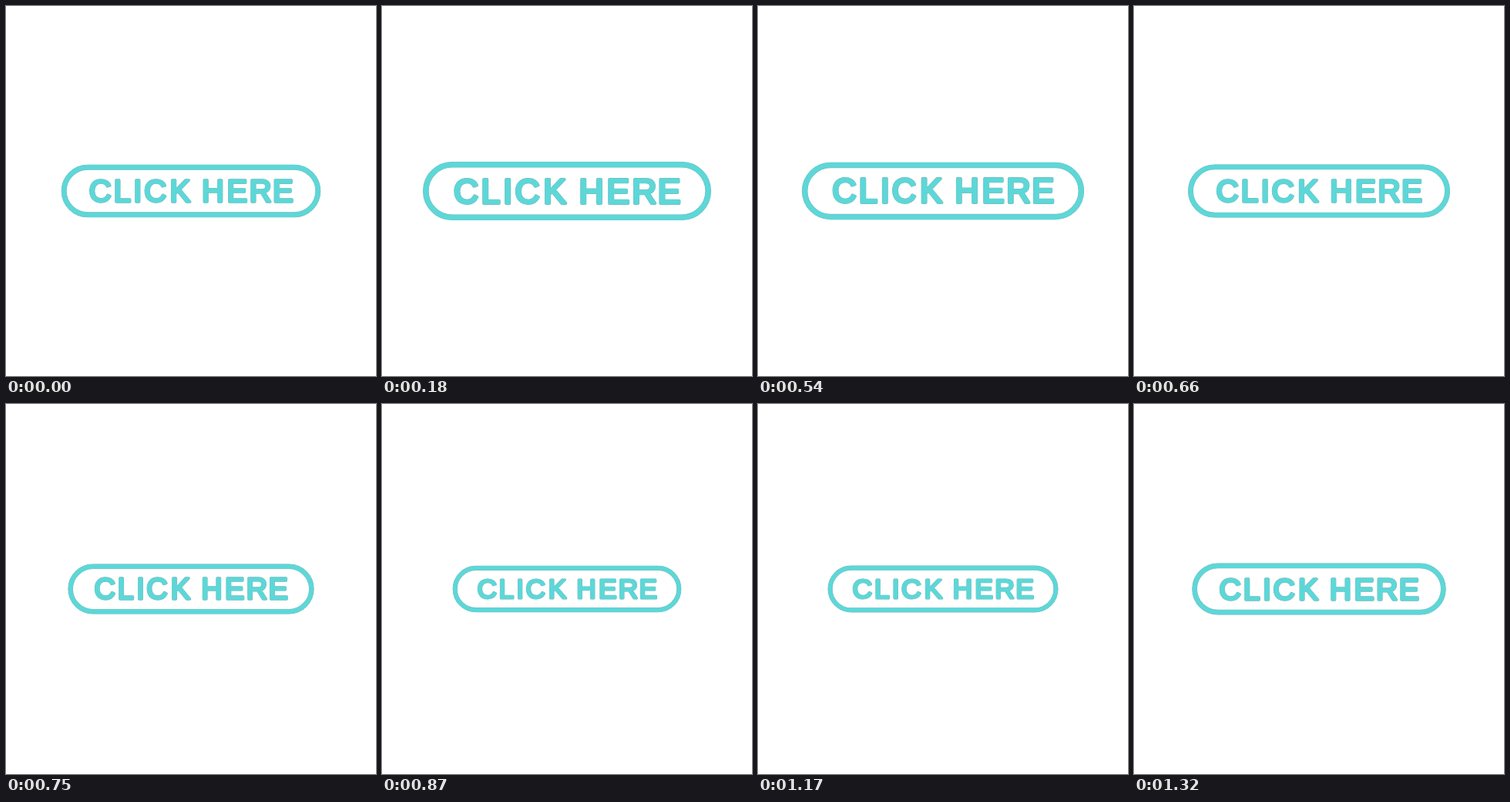
Write an HTML page that moves like this. It is 480 by 480 pixels and loops after 1.35 s.

```html
<!DOCTYPE html>
<html lang="en">
<head>
<meta charset="utf-8">
<title>Click here</title>
<style>
  html, body { margin: 0; width: 100%; height: 100%; overflow: hidden; background: #fff; }
  svg { display: block; width: 100vw; height: 100vh; }
  rect { fill: none; stroke-width: calc(6.2px + var(--edge)); }
  text {
    font: 40px "Liberation Sans", Arial, sans-serif;
    stroke-width: calc(2.8px + var(--edge));
    stroke-linejoin: round;
  }
  .rim { --edge: .7px; fill: #2f7f80; stroke: #2f7f80; opacity: .6; }
  .face { --edge: 0px; fill: #5dd7d8; stroke: #5dd7d8; }
</style>
</head>
<body>
<svg viewBox="0 0 480 480">
  <defs>
    <g id="label">
      <rect x="-164.8" y="-30.8" width="329.6" height="61.6" rx="30.8"/>
      <text y="14" x="-132.2 -100.3 -74.7 -60.8 -27.6 -2 14 46.4 75.7 106">CLICK HERE</text>
    </g>
  </defs>
  <g id="button" transform="translate(240 240)">
    <use href="#label" class="rim"/>
    <use href="#label" class="face"/>
  </g>
</svg>
<script>
  const LOOP = 1350, STEP = 30, SWELL = 0.15;
  const button = document.getElementById('button');

  function draw(now) {
    const t = Math.floor((now % LOOP) / STEP) * STEP;
    const scale = 1 + SWELL * Math.sin(2 * Math.PI * t / LOOP);
    button.setAttribute('transform', `translate(240 240) scale(${scale})`);
    requestAnimationFrame(draw);
  }
  requestAnimationFrame(draw);
</script>
</body>
</html>
```
